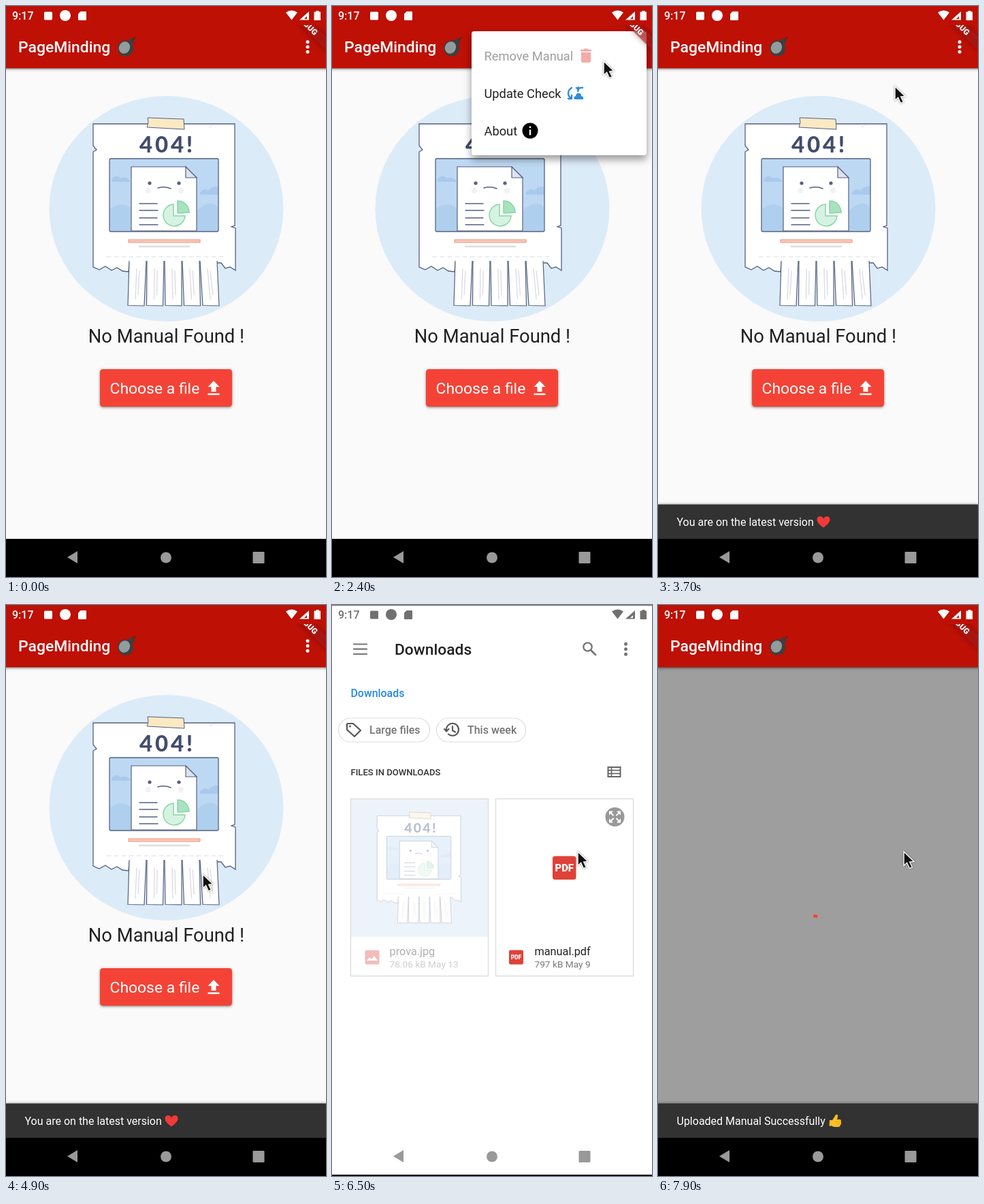
Write an HTML page that moves like this. It is 470x838 px and loops after 8 s.

```html
<!DOCTYPE html>
<html lang="en">
<head>
<meta charset="utf-8">
<style>
html, body { margin: 0; width: 100%; height: 100%; overflow: hidden; background: #000; }
svg { display: block; width: 100vw; height: 100vh; font-family: Roboto, sans-serif; }
.medium { font-weight: 500; }
.line { fill: none; stroke-linecap: round; stroke-linejoin: round; }
.raised { filter: drop-shadow(0 1px 1px rgba(0, 0, 0, .25)) drop-shadow(0 1px 2px rgba(0, 0, 0, .3)); }
.menu { filter: drop-shadow(0 6px 6px rgba(0, 0, 0, .4)); }
</style>
</head>
<body>
<svg id="stage" viewBox="0 0 470 838" xmlns="http://www.w3.org/2000/svg"></svg>
<script>
const LOOP = 8000, STEP = 100;
const INK = '#566080';
const stage = document.getElementById('stage');

const text = (x, y, size, fill, str, extra = '') =>
  `<text x="${x}" y="${y}" font-size="${size}" fill="${fill}" ${extra}>${str}</text>`;
const rect = (x, y, w, h, fill, extra = '') =>
  `<rect x="${x}" y="${y}" width="${w}" height="${h}" fill="${fill}" ${extra}/>`;
const circle = (x, y, r, fill, extra = '') =>
  `<circle cx="${x}" cy="${y}" r="${r}" fill="${fill}" ${extra}/>`;
const path = (d, fill, extra = '') => `<path d="${d}" fill="${fill}" ${extra}/>`;
const line = (d, stroke, width, extra = '') =>
  `<path class="line" d="${d}" stroke="${stroke}" stroke-width="${width}" ${extra}/>`;
const group = (content, extra = '') => `<g ${extra}>${content}</g>`;
const dots = (x, y, gap, fill) => [-1, 0, 1].map(i => circle(x, y + i * gap, 2.5, fill)).join('');
const medium = 'class="medium"';

// Tear-off strips fan out slightly towards their lower ends.
function strip(i) {
  const top = 181 + i * 26, low = 179 + i * 27.5;
  return path(`M${top} 374L${low} 439.5l24 .5L${top + 25} 374`, '#fff', `stroke="${INK}" stroke-width="1.2"`) +
    line(`M${top + 11} 386L${low + 11} 430M${top + 15} 389L${low + 15} 424`, '#dcdde3', 1.4);
}

const poster =
  path('M128 173H336V322l-5 2 6 2V388l-8-5-7 2-6-8H181l-1 13-9-1-8-5-8 4-9-6-9 5-9-4V214l5-3-5-6Z', '#fff',
    `stroke="${INK}" stroke-width="1.3"`) +
  line('M299 178l6-4M148 368H320', '#d8dce5', 1, 'stroke-dasharray="6 5"') +
  path('M208 164l53 2 1 15-55-3 2-7Z', '#fbe9c3', `stroke="${INK}" stroke-width="1"`) +
  text(196, 215, 33, '#424c6d', '404!', 'font-family="Lato, sans-serif" font-weight="800" letter-spacing="3.800"') +
  rect(152, 224, 160, 107, '#bdd8f3', 'rx="2"') +
  path('M153 298q15-13 31-1v33h-31ZM281 300q18-17 30-5v35h-30Z', '#aecfee') +
  path('M155 254q8-8 13-1 9-4 16 5h-29ZM285 274q6-8 12-3 8-8 15-6v12h-27Z', '#a9c9ee') +
  rect(152, 224, 160, 107, 'none', `rx="2" stroke="${INK}" stroke-width="1.3"`) +
  path('M184 236H264L280 252V330H184Z', '#fff', `stroke="${INK}" stroke-width="1.2"`) +
  path('M264 236V252H280Z', '#dde3ef', `stroke="${INK}" stroke-width="1.2"`) +
  circle(211, 260, 2.6, INK) + circle(254, 260, 2.6, INK) +
  circle(209, 271, 4, '#f3f1f4') + circle(257, 271, 4, '#f3f1f4') +
  line('M223 267q10-3 19 1M196 290h26M196 300h27M196 311h26M196 321h27', INK, 1.4) +
  path('M246 291a16 16 0 1 0 17 17H246Z', '#d6f3e1', 'stroke="#86d5a6" stroke-width="1.5"') +
  path('M252 286a17 17 0 0 1 17 17l-17 1Z', '#a8e3bf', 'stroke="#86d5a6" stroke-width="1.5"') +
  rect(180, 343, 105, 4, '#fbcabd', 'stroke="#ef8f78" stroke-width="1"') +
  line('M196 353h73', '#dcdde0', 2.5) +
  [0, 1, 2, 3, 4].map(strip).join('');

const bomb =
  circle(175.5, 62, 11.5, '#3b3f40') + path('M179 51l5-4 5 5-4 5Z', '#3b3f40') +
  line('M186 50q2-3 4-4', '#3a3030', 1.6) +
  '<ellipse cx="174" cy="61" rx="8" ry="9" fill="#929c9d" transform="rotate(28 174 61)"/>';

const heart = path('M243 765.500C237 761 233.500 758 233.500 753.500C233.500 748 241 747.500 243 752.500C245 747.500 252.500 748 252.500 753.500C252.500 758 249 761 243 765.500Z', '#f03a3a');

const thumb = path('M252 756h4l4-6 1-2q4-1 3 3l-1 4h4q3 1 1.500 3q1.500 1.500 0 3q1 2-1 2.500q0 2.500-3 2.500h-6l-3-1.500h-4Z', '#fcbd25') +
  line('M262 758.500h5M262 761.500h5', '#e69a1c', .7);

const ribbon = group(
  group(rect(-46, 32, 92, 13.7, '#b71c1c', 'fill-opacity=".63" style="filter:drop-shadow(0 0 4px rgba(0,0,0,.5))"') +
    text(0, 43, 11.7, '#fff', 'DEBUG', 'font-weight="900" text-anchor="middle"'),
    'transform="translate(470 0) rotate(45)"'), 'clip-path="url(#belowStatus)"');

const emptyBody = group(
  rect(0, 85, 470, 697, '#fafafa') +
  '<ellipse cx="235.500" cy="297.500" rx="172" ry="165.500" fill="#dcebf8"/>' + poster +
  text(235.5, 494, 27.4, '#212121', 'No Manual Found !', 'text-anchor="middle"') +
  rect(138, 533, 194, 55, '#f44336', 'rx="4.500" class="raised"') +
  text(152.5, 569, 22.9, '#fff', 'Choose a file') +
  path('M305 550l8.500 9h-5v7h-7v-7h-5ZM296.500 568.500h17v2.500h-17Z', '#fff'), 'id="empty"');

const loadingBody = group(
  rect(0, 85, 470, 697, '#9e9e9e') +
  '<path id="spinner" fill="none" stroke="#f44336" stroke-width="4.600" stroke-linecap="square"/>', 'id="loading"');

const menu = group(
  group(rect(205, 37, 257, 182, '#fff', 'rx="4" id="sheet"'), 'class="menu"') +
  group(
    text(223.5, 79.5, 18.3, '#9e9e9e', 'Remove Manual') +
    path('M365 64h4.500l1-1.500h5l1 1.500h4.500v2.500h-16ZM366 68h14v13q0 2-2 2h-10q-2 0-2-2Z', '#f5aaa5') +
    text(223.5, 134.5, 18.3, '#212121', 'Update Check') +
    line('M352 120q-5 3-5 8t5 8M347 136h5v-5M368 120q-6-1-7 5', '#2f8fd9', 2.4) +
    path('M357 120l6-2v7ZM356 137q-2-4 2-5 1-5 5-4 3 0 3 4 4 1 3 5Z', '#2f8fd9') +
    text(223.5, 189.5, 18.3, '#212121', 'About') +
    circle(291, 183, 11.5, '#000') + rect(289.8, 181.5, 2.4, 8, '#fff') + rect(289.8, 176.5, 2.4, 2.6, '#fff'),
    'id="items"'), 'id="menu"');

const snackbar = group(
  rect(0, 731.5, 470, 52, '#323232', 'style="filter:drop-shadow(0 0 2px rgba(0,0,0,.4))"') +
  group(text(27.5, 763, 16, '#fff', 'You are on the latest version') + heart, 'id="latest"') +
  group(text(27.5, 763, 16, '#fff', 'Uploaded Manual Successfully') + thumb, 'id="uploaded"'), 'id="snackbar"');

const app = group(
  emptyBody + loadingBody +
  rect(-10, -10, 490, 101.4, '#be1005', 'class="raised"') +
  text(18, 68, 22.9, '#fff', 'PageMinding', medium) + group(bomb, 'id="bomb"') +
  group(dots(443, 60, 7.3, '#fff'), 'id="more"') +
  menu + snackbar + rect(-10, 782, 490, 70, '#000') + ribbon, 'id="app"');

const chip = (x, w, label, labelX) =>
  rect(x, 166, w, 35, '#fff', 'rx="17.500" stroke="#dcdee1" stroke-width="1.200"') +
  text(labelX, 189, 16, '#757575', label, medium);

const pdf = (x, y, size, font) =>
  rect(x, y, size, size, '#de4238', `rx="${size / 9}"`) +
  text(x + size / 2, y + size / 2 + font * .36, font, '#fff', 'PDF', 'text-anchor="middle" font-weight="900"');

const fileCard = (x, name, info) =>
  rect(x, 284.5, 202, 260, '#fff', 'stroke="#dcdcdc" stroke-width="1.300"') +
  text(x + 57, 514, 16.3, '#212121', name) + text(x + 57, 532, 13.7, '#777', info);

const expandArrows = [0, 90, 180, 270].map(a =>
  group(line('M2.500 -2.500L7 -7', '#fff', 2) + path('M8.500 -8.500v6l-6-6Z', '#fff'),
    `transform="translate(415.500 311) rotate(${a})"`)).join('');

const picker = group(
  rect(0, 0, 470, 838, '#fff') + rect(0, 0, 470, 1, '#666') + rect(0, 836, 470, 2, '#111') +
  line('M32 57.500h19M32 64.700h19M32 72h19', '#757575', 2.2) +
  text(92, 73, 22.8, '#212121', 'Downloads', medium) +
  circle(375.5, 61.5, 6.2, 'none', 'stroke="#757575" stroke-width="2.300"') + line('M380 66l7 7', '#757575', 2.8) +
  dots(431.5, 64.7, 7.5, '#757575') +
  text(27.5, 135, 15.9, '#2388e8', 'Downloads', medium) +
  chip(9.5, 134, 'Large files', 55) + chip(153.5, 131, 'This week', 199) +
  line('M23 174h8l11 10-9 9-11-10v-8Z', '#555', 2.2) + circle(26.5, 178, 1.5, '#555') +
  line('M168 183a9 9 0 1 1 3 6.500M165 182l3 3.500 3.500-3.500M177 178v6l4 2.500', '#555', 2.1) +
  text(27.5, 250, 13.1, '#333', 'FILES IN DOWNLOADS', medium) +
  rect(405.5, 238, 18, 14, 'none', 'stroke="#666" stroke-width="2"') +
  line('M406 242.700h17M406 247.400h17M410.500 238v14', '#666', 1.7) +
  rect(27.5, 284.5, 202, 260, '#fff', 'stroke="#dcdcdc" stroke-width="1.300"') +
  group(
    fileCard(27.5, 'prova.jpg', '78.06 kB May 13') + rect(28, 285, 201, 202, '#cddef2') +
    group(poster, 'transform="translate(-9.300 207.200) scale(.59)"') +
    rect(48.5, 506.5, 21, 21, '#de4238', 'rx="2.500"') + path('M51 522l4-5 3 3 4-5 5 7Z', '#fff'),
    'opacity=".35"') +
  fileCard(240.5, 'manual.pdf', '797 kB May 9') +
  circle(415.5, 311, 14, '#999') + expandArrows + pdf(324, 368.5, 34.5, 15) + pdf(260, 506.5, 21, 8.5),
  'id="picker"');

const statusBar = group(
  text(9, 20, 16, 'currentColor', '9:17', medium) +
  rect(56, 8.500, 12, 12, 'currentColor', 'rx="1.500"') +
  circle(87, 14, 8, 'currentColor') +
  path('M109.500 8H117q1 0 1 1v11q0 1-1 1h-10q-1 0-1-1v-8.500Z', 'currentColor') +
  path('M411 9.500q8.500-6 17 0l-8.500 11Z', 'currentColor') +
  path('M445 8V20.500H431ZM442 15l-4 4h4Z', 'currentColor', 'fill-rule="evenodd"') +
  path('M455.500 7h4v1.500h2.500v12.500h-9.500v-12.500h3Z', 'currentColor'), 'id="status"');

const navBar = group(
  path('M90 809l15-9v18Z', '#999') + circle(235, 809.5, 8, '#999') + rect(362.5, 801, 17, 17, '#999', 'rx="1"'));

const pointer = path('M0 0V20.500l4.600-4.200 3.700 8.300 4.100-1.800-3.700-7.800 6.300-.600Z', '#111',
  'id="pointer" stroke="#fff" stroke-width="1.400" style="filter:drop-shadow(0 0 1px rgba(0,0,0,.5))"');

stage.innerHTML = '<clipPath id="belowStatus"><rect x="350" y="28" width="130" height="100"/></clipPath>' +
  app + rect(0, 0, 470, 838, '#101030', 'id="dim" opacity=".05"') + picker + statusBar + navBar + pointer;

const el = id => document.getElementById(id);
const show = (id, on) => el(id).setAttribute('display', on ? 'inline' : 'none');
const fade = (id, v) => el(id).setAttribute('opacity', v);
const zoom = (id, s) => el(id).setAttribute('transform', `translate(235 419) scale(${s}) translate(-235 -419)`);
const clamp = v => Math.max(0, Math.min(1, v));
const ramp = (t, from, to) => clamp((t - from) / (to - from));
const smooth = p => p * p * (3 - 2 * p);

// Material's cubic-bezier(.4, 0, .2, 1), solved by bisection.
function standardEase(p) {
  if (p <= 0 || p >= 1) return clamp(p);
  const bez = (a, b, u) => 3 * a * u * (1 - u) ** 2 + 3 * b * u * u * (1 - u) + u ** 3;
  let lo = 0, hi = 1;
  for (let i = 0; i < 24; i++) {
    const mid = (lo + hi) / 2;
    if (bez(.4, .2, mid) < p) lo = mid; else hi = mid;
  }
  return bez(0, 1, lo);
}

const POINTER_KEYS = [
  [1000, 466, 400], [1500, 440, 58], [2000, 440, 58], [2300, 399, 81], [2500, 399, 81],
  [2800, 348, 118], [4600, 348, 118], [5100, 257, 546], [5500, 257, 546], [6200, 361, 362], [LOOP, 361, 362]
];

function pointerAt(t) {
  const i = POINTER_KEYS.findIndex(k => k[0] > t);
  if (i < 1) return POINTER_KEYS[0].slice(1);
  const [t0, x0, y0] = POINTER_KEYS[i - 1], [t1, x1, y1] = POINTER_KEYS[i];
  const p = smooth(ramp(t, t0, t1));
  return [x0 + (x1 - x0) * p, y0 + (y1 - y0) * p];
}

function drawSpinner(ms) {
  const cycle = (ms / 1333) % 1, r = 20.6;
  const head = standardEase(cycle * 2) * 1.5 * Math.PI;
  const tail = standardEase(cycle * 2 - 1) * 1.5 * Math.PI;
  const start = -Math.PI / 2 + tail + ms / 2222 * 2 * Math.PI + cycle * Math.PI / 2;
  const sweep = Math.max(head - tail, .003);
  const at = a => `${235 + r * Math.cos(a)} ${436.3 + r * Math.sin(a)}`;
  el('spinner').setAttribute('d', `M${at(start)}A${r} ${r} 0 ${sweep > Math.PI ? 1 : 0} 1 ${at(start + sweep)}`);
}

function drawMenu(p) {
  const w = 257 * clamp(p / .22), h = 182 * clamp(p / .67);
  show('menu', p > 0);
  fade('menu', clamp(p * 3));
  fade('items', ramp(p, .3, .9));
  el('sheet').setAttribute('x', 462 - w);
  el('sheet').setAttribute('width', w);
  el('sheet').setAttribute('height', h);
}

function drawSnackbar(p, done) {
  show('snackbar', p > 0);
  el('snackbar').setAttribute('transform', `translate(0 ${52 * (1 - standardEase(p))})`);
  show('latest', !done);
  show('uploaded', done);
  fade(done ? 'uploaded' : 'latest', ramp(p, .4, 1));
}

function draw(t) {
  const done = t >= 6600, picking = t >= 5300 && !done;
  show('empty', !done);
  show('loading', done);
  show('more', !done);
  show('bomb', t < 6600 || t > 6650);
  show('picker', picking);
  show('dim', picking);
  el('status').setAttribute('color', picking && t >= 5400 ? '#707070' : '#fff');

  if (done) zoom('app', 1 + .018 * Math.exp((6600 - t) / 70));
  else zoom('app', t > 5250 ? 1 + .05 * (1 - Math.exp((5250 - t) / 105)) : 1);
  zoom('picker', 1 - .034 * Math.exp((5400 - t) / 90));
  fade('picker', ramp(t, 5250, 5350));

  drawMenu(t < 2600 ? ramp(t, 1700, 2000) : 1 - ramp(t, 2900, 3100));
  drawSnackbar(done ? ramp(t, 6800, 7050) : ramp(t, 3100, 3400), done);
  drawSpinner(Math.max(0, t - 6670));

  show('pointer', t >= 1000);
  el('pointer').setAttribute('transform', `translate(${pointerAt(t).join(' ')})`);
}

const begin = performance.now();
function tick() {
  const t = (performance.now() - begin) % LOOP;
  draw(Math.floor(t / STEP) * STEP);
  requestAnimationFrame(tick);
}
tick();
</script>
</body>
</html>
```
